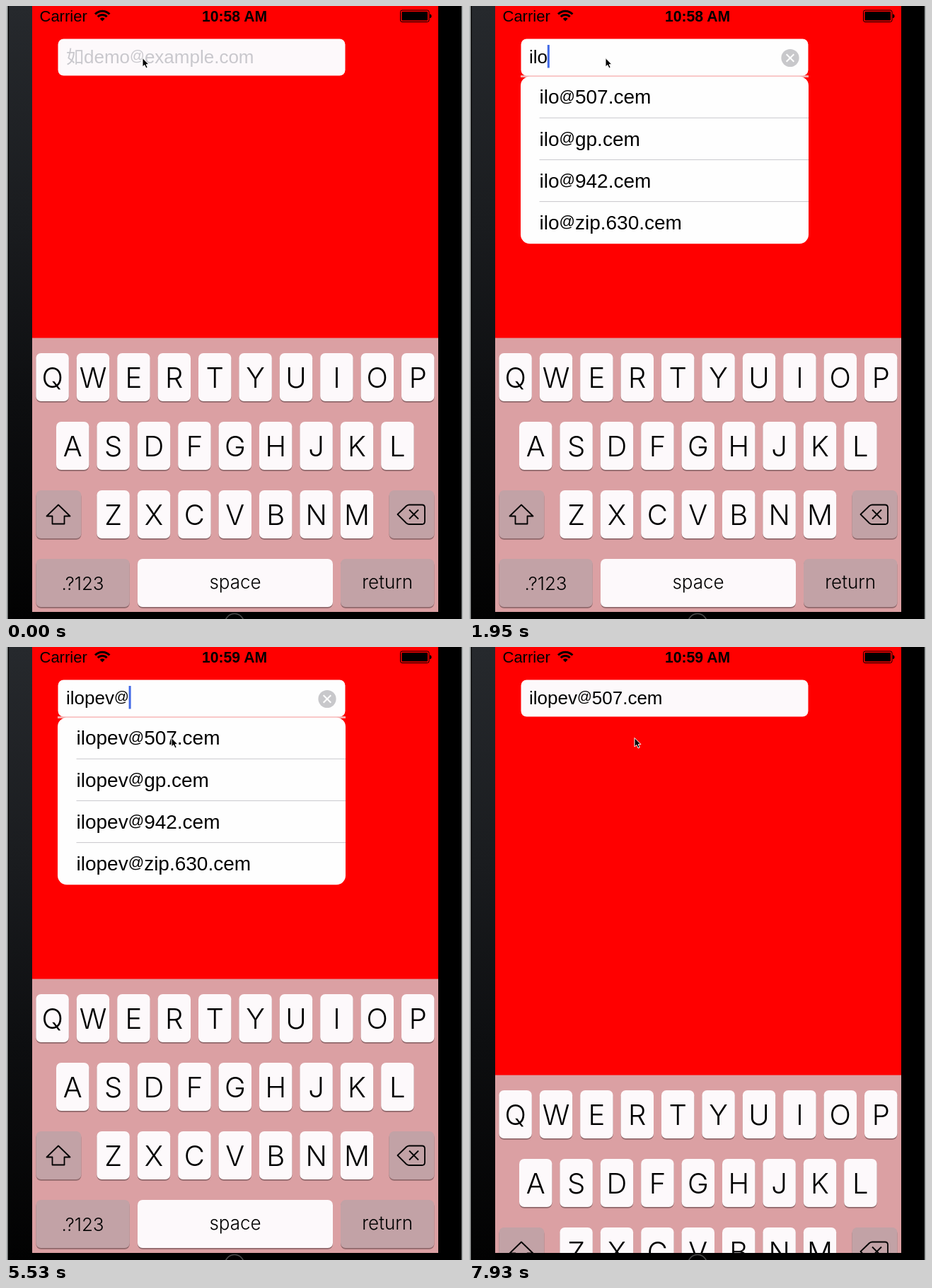
An HTML page for the animation above (8 s loop, 646 by 867 pixels).

```html
<!DOCTYPE html>
<html lang="en">
<head>
<meta charset="utf-8">
<title>Mail field with suggestions</title>
<style>
html, body { margin: 0; width: 100%; height: 100%; overflow: hidden; background: #000; }
svg { display: block; width: 100vw; height: 100vh; }
text { font-family: "Liberation Sans", Arial, sans-serif; white-space: pre; }
.key { font: 300 40px Inter, sans-serif; text-anchor: middle; }
.word { font: 300 26px Inter, sans-serif; text-anchor: middle; }
.field { font-size: 26px; }
.item { font-size: 28px; }
.at { font-size: .79em; }
.cjk { font-family: "Noto Sans CJK SC", "Noto Sans CJK", sans-serif; font-weight: 300; font-size: 25px; }
</style>
</head>
<body>
<svg viewBox="0 0 646 867" preserveAspectRatio="none">
  <defs>
    <linearGradient id="side" x1="0" y1="0" x2="0" y2="1">
      <stop offset="0" stop-color="#26292d"/>
      <stop offset=".35" stop-color="#1a1c1f"/>
      <stop offset=".65" stop-color="#0d0e10"/>
      <stop offset="1" stop-color="#020202"/>
    </linearGradient>
  </defs>
  <rect width="646" height="867" fill="#000"/>
  <rect x="4" width="33" height="867" fill="url(#side)"/>
  <rect width="2.5" height="867" fill="#b4b8b8"/>
  <rect x="644" width="2" height="867" fill="#a4a8a8"/>
  <rect x="37" width="574" height="857" fill="#f00"/>

  <text x="47.5" y="22" font-size="22">Carrier</text>
  <g fill="none" stroke="#000" stroke-width="3">
    <path d="M126 11.5a14.3 14.3 0 0 1 20.4 0M129.8 15.2a9 9 0 0 1 12.8 0"/>
    <path d="M136.2 21.5l-3.4-3.6a4.8 4.8 0 0 1 6.8 0z" fill="#000" stroke="none"/>
  </g>
  <text id="clock" x="323" y="22" font-size="21.2" font-weight="700" text-anchor="middle"></text>
  <rect x="557.5" y="6" width="40.5" height="16.5" rx="2.5" fill="none" stroke="#000"/>
  <rect x="559.5" y="8" width="36.5" height="12.5" rx="1" fill="#000"/>
  <path d="M599 11.5q2.5 0 2.5 2.8t-2.5 2.8z"/>

  <g id="list">
    <rect x="73" y="98" width="407" height="3" fill="#f6a9a9"/>
    <rect x="73" y="99.7" width="407" height="236.6" rx="13" fill="#fefefe"/>
    <path d="M99.5 158.2H480M99.5 217.4H480M99.5 276.6H480" stroke="#c8c7cc"/>
    <g id="rows"></g>
  </g>
  <rect id="box" x="73.5" y="46.5" width="406" height="52" rx="8"/>
  <text id="hint" class="field" x="85" y="81" fill="#c9c8cd"></text>
  <text id="entry" class="field" x="85" y="81"></text>
  <g id="clear">
    <circle cx="454" cy="73.5" r="12.6" fill="#c8c8cb"/>
    <path d="M448.7 68.2l10.6 10.6m0-10.6l-10.6 10.6" stroke="#fff" stroke-width="2"/>
  </g>
  <rect id="caret" y="55" width="3" height="32.5" fill="#4169e6"/>

  <g id="board"></g>
  <rect x="37" y="857" width="574" height="10" fill="#000"/>
  <circle cx="323" cy="873" r="13.5" fill="none" stroke="#4c4c4c" stroke-width="1.6"/>
  <path id="pointer" d="M0 0V12.6L2.9 10L5 14.6L7.2 13.6L5.2 9.2H9Z" stroke="#fff" stroke-width="1"/>
</svg>
<script>
const LOOP = 8000, HIDE = 7930;
const USER = "ilopev", DOMAINS = ["507.cem", "gp.cem", "942.cem", "zip.630.cem"];
const FULL = USER + "@" + DOMAINS[0];
const TYPED = [1650, 1800, 1950, 2400, 2550, 2700, 5530, 5830, 5830, 6130, 6280, 6430, HIDE, HIDE];
// [time, opacity]
const BLINK = [[0, 0], [300, .4], [450, 1], [1200, .5], [1350, 0], [1500, .65], [1650, 1], [3300, 0], [3740, 1],
  [4630, .5], [4780, 0], [5230, .5], [5380, 1], [7030, .5], [7180, 0], [7480, .5], [7630, 1], [HIDE, 0]];
// [time, share of the pointer's way]
const GLIDE = [[0, 0], [3890, .15], [4040, .5], [4180, .85], [4330, 1]];

const el = id => document.getElementById(id);
const at = (steps, t) => steps.filter(s => s[0] <= t).pop()[1];
const show = (id, on) => el(id).setAttribute("display", on ? "inline" : "none");

// Sets the at sign smaller and raised.
function mail(s) {
  const [name, host] = s.split("@");
  if (host === undefined) return name;
  return `${name}<tspan class="at" dy="-3.6">@</tspan><tspan dy="3.6">${host}</tspan>`;
}

function cap(x, y, w, fill = "#fdf9fb") {
  return `<rect x="${x}" y="${y + 1.8}" width="${w}" height="68" rx="7" fill="#8f686b"/>` +
    `<rect x="${x}" y="${y}" width="${w}" height="68" rx="7" fill="${fill}"/>`;
}

function keyRow(letters, x, y) {
  return [...letters].map((c, i) => {
    const left = x + 57.4 * i;
    return cap(left, y, 46.4) + `<text class="key" x="${left + 23.2}" y="${y + 49}">${c}</text>`;
  }).join("");
}

function wordKey(word, x, w, base, fill) {
  return cap(x, 782, w, fill) + `<text class="word" x="${x + w / 2}" y="${base}">${word}</text>`;
}

const DARK = "#c2a2a6";
el("board").innerHTML =
  `<rect x="37" y="469.5" width="574" height="388" fill="#dba0a3"/>` +
  keyRow("QWERTYUIOP", 42.4, 491) + keyRow("ASDFGHJKL", 71, 588) + keyRow("ZXCVBNM", 128.4, 685) +
  cap(42.4, 685, 64, DARK) + cap(541.5, 685, 64, DARK) +
  `<g fill="none" stroke="#000" stroke-width="1.8" stroke-linejoin="round">
    <path d="M74 705.5L90.5 721.5H82.5V732.5H65.5V721.5H57.5Z"/>
    <path d="M553.5 719L566 707Q568 705.5 570 705.5H588Q592 705.5 592 709.5V729Q592 733 588 733H570Q568 733 566 731.5Z"/>
    <path d="M570 712.5l13 13m0-13l-13 13"/>
  </g>` +
  wordKey(".?123", 42.4, 132.4, 826, DARK) + wordKey("space", 186, 276, 824) +
  wordKey("return", 473, 132.4, 824, DARK);

el("hint").innerHTML = `<tspan class="cjk">如</tspan>` + mail("demo@example.com");

let last = null;
function setEntry(text) {
  if (text === last) return;
  last = text;
  el("entry").innerHTML = mail(text);
  const [name, host = ""] = text.split("@");
  el("rows").innerHTML = DOMAINS.filter(d => d.startsWith(host)).map((d, i) =>
    `<text class="item" x="99.5" y="${138.3 + 59.2 * i}">${mail(name + "@" + d)}</text>`).join("");
}

function draw(t) {
  const text = FULL.slice(0, TYPED.filter(k => k <= t).length);
  const open = text !== "" && t < HIDE;
  setEntry(text);
  show("hint", !text);
  show("list", open);
  show("clear", open);
  el("box").setAttribute("fill", open ? "#fefefe" : "#fdf9fb");
  el("caret").setAttribute("x", 84.8 + (text ? el("entry").getComputedTextLength() : 0));
  el("caret").setAttribute("opacity", at(BLINK, t));
  el("clock").textContent = t < 4630 ? "10:58 AM" : "10:59 AM";
  const p = at(GLIDE, t);
  el("pointer").setAttribute("transform", `translate(${193 + 41 * p} ${73.5 + 55 * p})`);
  el("board").setAttribute("transform", `translate(0 ${t < HIDE ? 0 : 136})`);
}

function tick() {
  draw(performance.now() % LOOP);
  requestAnimationFrame(tick);
}
tick();
</script>
</body>
</html>
```
